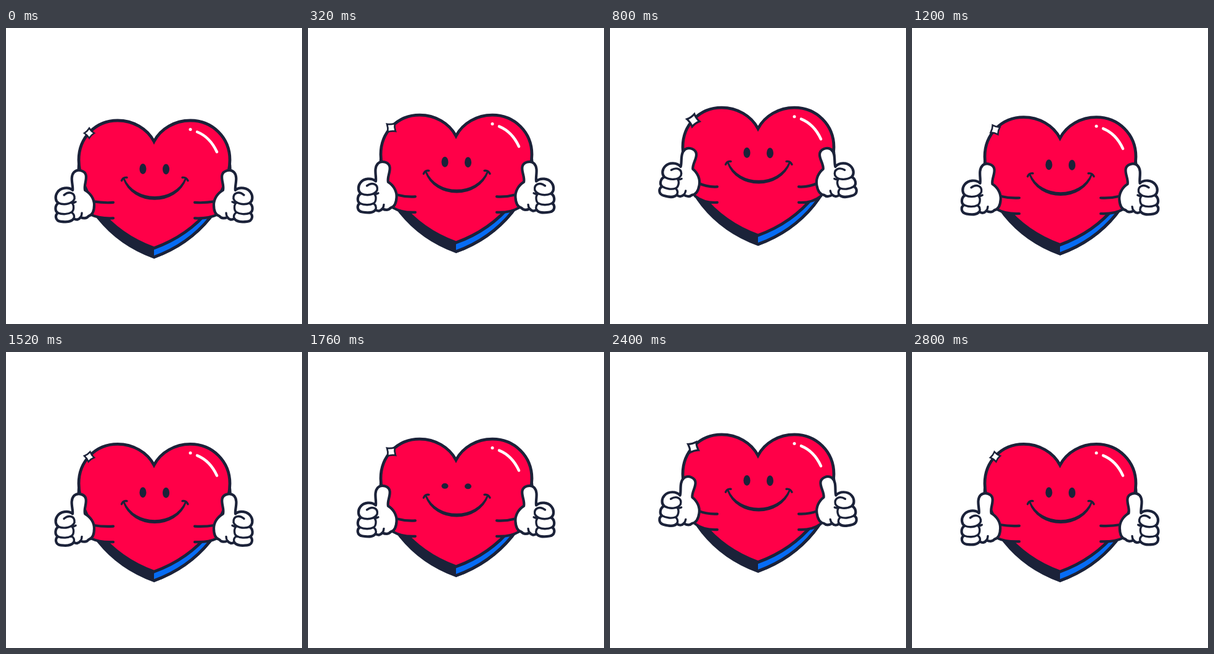
An HTML page for the animation above (2880 ms loop, 480 px wide and 480 px high).

```html
<!DOCTYPE html>
<html lang="en">
<head>
<meta charset="utf-8">
<title>Thumbs-up heart</title>
<style>
  html, body { margin: 0; width: 100%; height: 100%; overflow: hidden; background: #fff; }
  svg { display: block; width: 100%; height: 100%; }
  .ink { stroke: #1b2239; stroke-width: 4.2; stroke-linecap: round; stroke-linejoin: round; fill: none; }
  .edge { stroke-width: 4.8; stroke-linejoin: miter; }
  .white { fill: #fff; }
  .red { fill: #ff0048; }
  .navy { fill: #1b2239; }
  .blue { fill: #066cf5; }
</style>
</head>
<body>
<svg viewBox="0 0 480 480">
  <defs>
    <path id="shape" d="M240 184C229 163 206 150 181 150C145 150 118 178 118 214C118 264 163 329 240 357C317 329 363 264 363 214C363 178 335 150 299 150C274 150 251 163 240 184Z"/>
    <clipPath id="rightHalf"><rect x="240" y="200" width="140" height="180"/></clipPath>
  </defs>
  <g id="figure">
    <g id="heart">
      <use href="#shape" y="14.500" class="ink edge navy"/>
      <g clip-path="url(#rightHalf)">
        <use href="#shape" y="14.500" class="ink edge blue"/>
      </g>
      <use href="#shape" class="ink edge red"/>
      <circle class="white" cx="299" cy="164.500" r="2.500"/>
      <path d="M310 168.500Q331 177 342 201" fill="none" stroke="#fff" stroke-width="4.500" stroke-linecap="round"/>
    </g>
    <path id="star" class="ink white" style="stroke-width:2.500;stroke-linejoin:miter;fill:#fff" d="M0-8Q3-3 8 0Q3 3 0 8Q-3 3-8 0Q-3-3 0-8Z"/>
    <g id="face">
      <g class="navy">
        <ellipse class="eye" cx="222" cy="228.500" rx="5.500" ry="8.500"/>
        <ellipse class="eye" cx="259.500" cy="229" rx="5.500" ry="8.500"/>
      </g>
      <path class="ink navy" style="stroke-width:2.800;fill:#1b2239" d="M191 244C206 288.500 276 288.500 291.500 244C274 284.500 208 284.500 191 244Z"/>
      <path class="ink" style="stroke-width:3.400" d="M187.500 247.500Q190 241.500 196 242.500M286 242.500Q292 241.500 295 247.500"/>
    </g>
    <g id="side">
      <path id="armFill" class="red"/>
      <path id="armLines" class="ink"/>
      <g id="hand">
        <path class="ink" style="fill:#fff" d="M108 263C109 255 103 242 110 234C116 228 128 231 129.500 239C131 247 126 255 128 263C137 268 143 277 143 287C143 296 141 303 134 305C131 309 126 309 121 307C118 311 114 312 110 309C106 315 98 315 89 314C80 313 79 304 84 300C79 297 79 288 85 284C80 281 79 273 83 267C88 259 101 257 108 263Z"/>
        <path class="ink" style="stroke-width:3.400" d="M85 284C95 288 108 285 111 277C112 267 102 264 94 271M107 284C111 288 110 297 106 299M84 300C92 303 101 302 106 299C111 302 111 306 110 309M107 284Q110 284 113 282M121 307Q123 304 123 300"/>
      </g>
    </g>
    <use href="#side" transform="matrix(-1 0 0 1 480 0)"/>
  </g>
</svg>
<script>
const LOOP = 2880, BOB = 1440, STEP = 80;
const el = id => document.getElementById(id);
const place = (id, transform) => el(id).setAttribute('transform', transform);
const eyes = document.querySelectorAll('.eye');

// Smooth bob between 0 and 1
const rise = t => (1 - Math.cos(2 * Math.PI * t / BOB)) / 2;

// Triangular pulse: 1 at the centre, 0 beyond the half width
const pulse = (t, centre, half) => Math.max(0, 1 - Math.abs(t - centre) / half);

function drawArm(lift) {
  const outer = -31 * lift, inner = -26 * lift;
  const top = `M142 ${281.5 + outer}Q158 ${284 + inner} 174 ${283 + inner}`;
  const bottom = `174 ${308.5 + inner}Q152 ${309.5 + inner} 138 ${303 + outer}`;
  el('armFill').setAttribute('d', `${top}L${bottom}Z`);
  el('armLines').setAttribute('d', `${top}M${bottom}`);
}

function draw(t) {
  const beat = t % BOB;
  const lift = rise(beat);
  // The hands trail the body, and their tilt trails a little more
  const handLift = rise(beat - 20), tilt = rise(beat - 60);
  const scale = 1 + 0.105 * pulse(beat, 640, 160);

  place('figure', `translate(240 240) scale(${scale}) translate(-240 -240)`);
  place('heart', `translate(0 ${-21.5 * lift})`);
  place('star', `translate(135 ${170.5 - 21.5 * lift}) rotate(${beat / 8}) scale(${1 + 0.3 * lift})`);
  place('face', `translate(0 ${-27 * lift})`);
  place('hand', `translate(${3 * tilt} ${-38.5 * handLift}) rotate(${10.3 * tilt} 111 283)`);
  drawArm(handLift);

  const open = 1 - 0.94 * pulse(t, 1840, 160);
  eyes.forEach(eye => eye.setAttribute('ry', 8.5 * open));
}

function tick() {
  const t = performance.now() % LOOP;
  draw(Math.floor(t / STEP) * STEP);
  requestAnimationFrame(tick);
}
tick();
</script>
</body>
</html>
```
